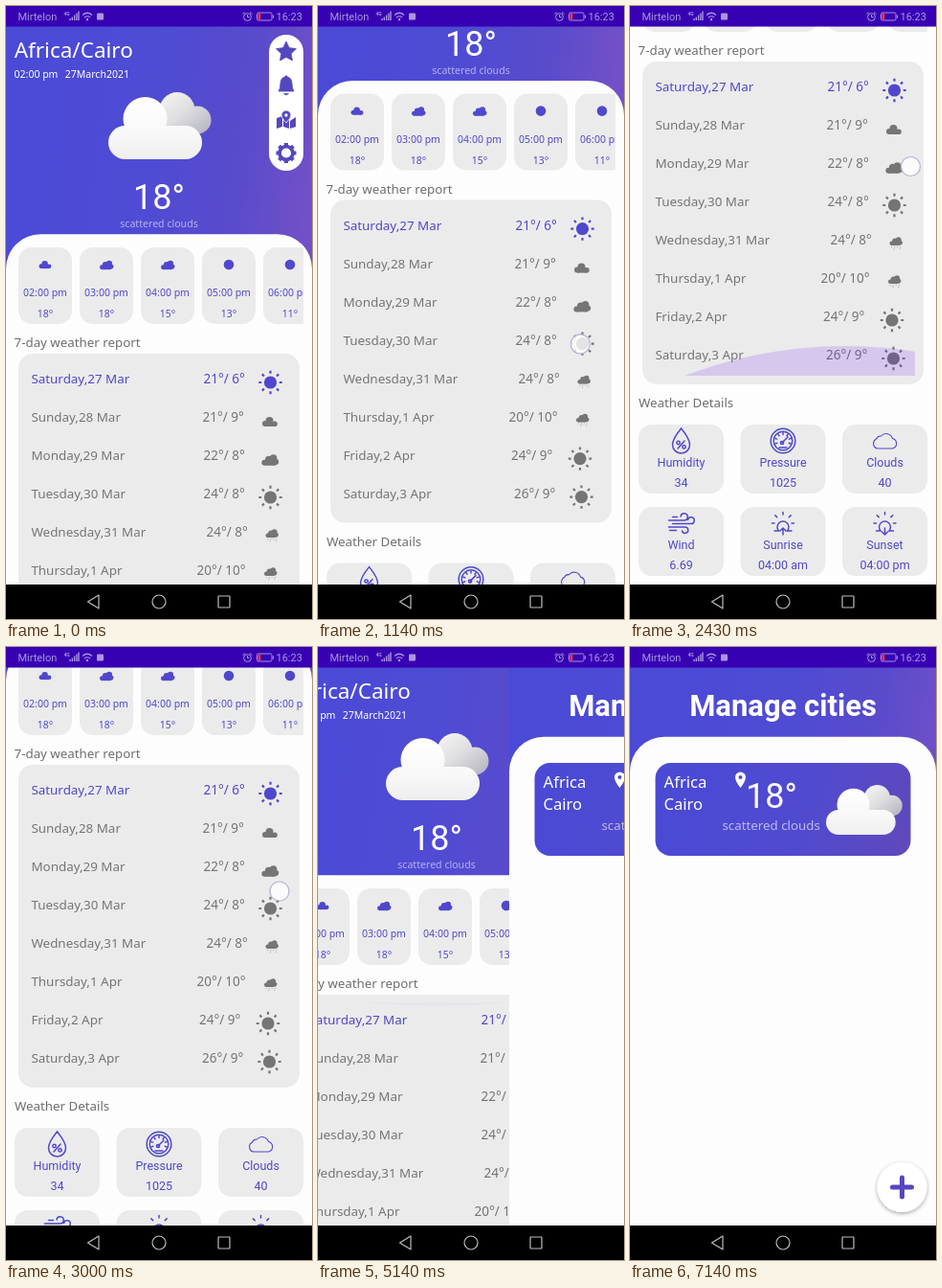
These frames come from a looping animation (320x640 px, 8 s). An HTML page:

```html
<!DOCTYPE html>
<html lang="en">
<head>
<meta charset="utf-8">
<title>Weather app</title>
<style>
  html, body { margin: 0; width: 100%; height: 100%; overflow: hidden; background: #000; }
  svg { display: block; width: 100vw; height: 100vh; }
  text { font-family: "Noto Sans", "Open Sans", sans-serif; white-space: pre; }
  .roboto { font-family: Roboto, Arial, sans-serif; }
</style>
</head>
<body>
<svg id="stage" viewBox="0 0 320 640"></svg>
<script>
const BLUE = '#5048cc', GREY = '#757575', CARD = '#ebebeb', PAPER = '#fdfdfd', INK = '#5547bd';

const text = (x, y, size, fill, str, extra = '') =>
  `<text x="${x}" y="${y}" font-size="${size}" fill="${fill}" ${extra}>${str}</text>`;
const mid = 'text-anchor="middle"';
const box = (x, y, w, h, r, fill, extra = '') =>
  `<rect x="${x}" y="${y}" width="${w}" height="${h}" rx="${r}" fill="${fill}" ${extra}/>`;
const dot = (x, y, r, extra = '') => `<circle cx="${x}" cy="${y}" r="${r}" ${extra}/>`;
const path = (d, extra = '') => `<path d="${d}" ${extra}/>`;
const at = (x, y, body, scale = 1, extra = '') =>
  `<g transform="translate(${x} ${y}) scale(${scale})" ${extra}>${body}</g>`;
const spokes = (n, r1, r2, from = 0, step = 360 / n) => Array.from({ length: n }, (_, i) => {
  const a = (from + i * step) * Math.PI / 180, c = Math.cos(a), s = Math.sin(a);
  return `M${(r1 * c).toFixed(2)} ${(r1 * s).toFixed(2)}L${(r2 * c).toFixed(2)} ${(r2 * s).toFixed(2)}`;
}).join('');

// Weather glyphs, centred on the origin and filled by their group
const glyph = {
  cloud: dot(-5, 2, 3) + dot(-.5, -1, 4) + dot(5, 2.2, 2.8) + path('M-5 0H5V5H-5Z'),
  sun: dot(0, 0, 6.6) + path(spokes(8, 9.3, 12.2), 'stroke="currentColor" stroke-width="2.2"'),
  moon: dot(0, 0, 5.3),
};
glyph.clouds = at(-.6, 1.3, glyph.cloud) + dot(3.6, -1.4, 3.8) + dot(6.6, 2.2, 2.6) + box(4, .5, 4.6, 5, 2, 'currentColor');
glyph.rain = at(0, -1.8, glyph.clouds, .76) +
  path('M-4 4l-1 2M-1 4l-1 4M2 4l-1 2M5 4l-1 3', 'stroke="currentColor" stroke-width=".8" stroke-dasharray="1.2 1" opacity=".7"');
const icon = (name, x, y, color, scale = 1) => at(x, y, glyph[name], scale, `fill="${color}" color="${color}"`);

// Large shaded cloud, 107 by 70
const bigCloud =
  `<g fill="url(#shade)">${dot(72, 18.5, 18.5)}${dot(93, 29, 14.5)}${path('M60 20H93V43.5H60Z')}</g>` +
  `<g fill="url(#puff)">${dot(17.5, 52.5, 17.5)}${dot(38.5, 28, 23)}${dot(80.5, 52.5, 17.5)}${path('M17.5 35H80.5V70H17.5Z')}</g>`;

const star = 'M' + Array.from({ length: 10 }, (_, i) => {
  const r = i % 2 ? 5.4 : 11, a = i * Math.PI / 5;
  return `${(r * Math.sin(a)).toFixed(2)} ${(-r * Math.cos(a)).toFixed(2)}`;
}).join('L') + 'Z';

const sideMenu = box(275, 30, 36, 142, 18, '#fff') + `<g fill="${INK}" stroke="${INK}" stroke-width=".8">` +
  at(293, 48, path(star, 'stroke-linejoin="round"')) +
  at(293, 83, path('M-8 6Q-6 3-6-2Q-6-8-1-9V-10H1V-9Q6-8 6-2Q6 3 8 6Z') + path('M-2.5 8.5H2.5L0 10Z')) +
  at(293, 119, path('M-10-2L-4-4V7L-10 9ZM-3-3L3 0V9L-3 7ZM4 1L10-3V7L4 9Z', 'stroke="none"') +
    path('M0 3Q-5-2-5-5A5 5 0 0 1 5-5Q5-2 0 3Z', 'stroke="#fff"') + dot(0, -5, 1.7, 'fill="#fff" stroke="none"')) +
  at(293, 153.5, dot(0, 0, 6.9, 'fill="none" stroke-width="3.6"') + path(spokes(8, 7, 10.5), 'stroke-width="4"')) + '</g>';

const header = box(0, 0, 320, 300, 0, 'url(#sky)') +
  text(8.7, 54, 22.5, '#fff', 'Africa/Cairo') +
  text(8.6, 75, 10.5, '#fff', '02:00 pm') + text(61.8, 75, 10.5, '#fff', '27March2021') +
  sideMenu + at(107, 90, bigCloud) +
  text(160, 212, 36, '#fff', '18°', mid + ' class="roboto"') +
  text(160, 231, 10.6, '#b5b1ec', 'scattered clouds', mid);

const hours = [['02', 18, 'cloud'], ['03', 18, 'clouds'], ['04', 15, 'clouds'], ['05', 13, 'moon'], ['06', 11, 'moon']]
  .map(([hour, deg, name], i) => {
    const x = 13 + 64 * i;
    return box(x, 252, 56, 80, 14, CARD) + icon(name, x + 28, 270, BLUE, name === 'moon' ? 1 : .82) +
      text(x + 28, 303, 10.5, BLUE, hour + ':00 pm', mid) + text(x + 28, 325, 10.4, BLUE, deg + '°', mid);
  }).join('');

const days = [
  ['Saturday,27 Mar', '21°/ 6°', 206.5, 'sun', 276.5, 393],
  ['Sunday,28 Mar', '21°/ 9°', 205.5, 'cloud', 276, 434],
  ['Monday,29 Mar', '22°/ 8°', 206.5, 'clouds', 276, 473.5],
  ['Tuesday,30 Mar', '24°/ 8°', 206.5, 'sun', 276.5, 513],
  ['Wednesday,31 Mar', '24°/ 8°', 209.6, 'rain', 278, 552],
  ['Thursday,1 Apr', '20°/ 10°', 199.6, 'rain', 276.5, 592],
  ['Friday,2 Apr', '24°/ 9°', 202, 'sun', 274, 633],
  ['Saturday,3 Apr', '26°/ 9°', 205, 'sun', 275.5, 673],
].map(([day, temp, x, name, ix, iy], i) => {
  const color = i ? GREY : BLUE, y = 394 + 40 * i;
  return text(26.4, y, 13.4, color, day) + text(x, y, 13.5, color, temp) + icon(name, ix, iy, color);
}).join('');

const halfSun = 'M-9 8H-4.5A6 6 0 1 1 4.5 8H9' + spokes(5, 9, 11.5, 180, 45);
const lineIcons = {
  Humidity: path('M0-13Q9-2 9 4A9 9 0 0 1-9 4Q-9-2 0-13ZM3.5 0L-3.5 8') + dot(-3, 2, 1.7) + dot(3, 6.4, 1.7),
  Pressure: dot(0, 0, 12.8) + dot(0, 0, 9.8) + path(spokes(7, 6.6, 8.5, 160, 36.7) + 'M-1 2L5-4M-4 7H4') + dot(-1, 2, 1.6),
  Clouds: path('M-8 8A5.4 5.4 0 0 1-9-2A5 5 0 0 1-4-5A7 7 0 0 1 8-2.5A5.4 5.4 0 0 1 8 8Z', 'stroke-width="1.1"'),
  Wind: path('M-13-3H3A3.6 3.6 0 1 0-.5-7M-9 .5H10A3.4 3.4 0 1 0 7-3.5M-13 4H4A3.2 3.2 0 1 1 1 8M-9-6.5H-4M-12 7.5H-5'),
  Sunrise: path(halfSun + 'M0 12V5M-3 8L0 5L3 8'),
  Sunset: path(halfSun + 'M0 5V12M-3 9L0 12L3 9'),
};
const details = [['Humidity', '34'], ['Pressure', '1025'], ['Clouds', '40'],
  ['Wind', '6.69'], ['Sunrise', '04:00 am'], ['Sunset', '04:00 pm']].map(([name, value], i) => {
  const x = 9 + 106.5 * (i % 3), y = i < 3 ? 742 : 828, c = x + 44.5, font = mid + ' class="roboto"';
  return box(x, y, 89, 72, 14, CARD) +
    at(c, y + 17, lineIcons[name], 1, `fill="none" stroke="${BLUE}" stroke-width="1.5" stroke-linecap="round"`) +
    text(c, y + 44, 12.5, BLUE, name, font) + text(c, y + 65, 12.5, BLUE, value, font);
}).join('');

const forecast = `<g id="scroller">${header}${box(0, 238.3, 320, 800, 36, PAPER)}
  <g clip-path="url(#strip)">${hours}</g>
  ${text(8.6, 356, 13.3, '#6e6e6e', '7-day weather report')}
  ${box(13, 363, 294, 337, 15, CARD)}${days}
  <g clip-path="url(#list)" fill="#6200ee">${dot(225, 0, 471, 'id="lowGlow"')}${dot(160, 0, 900, 'id="topGlow"')}</g>
  ${text(9, 724, 13.3, '#6e6e6e', 'Weather Details')}${details}</g>`;

const cities = box(0, 0, 320, 200, 0, 'url(#sky)') +
  text(160, 72, 31, '#fff', 'Manage cities', mid + ' class="roboto" font-weight="700"') +
  box(0, 93.8, 320, 600, 36, PAPER) + box(26.5, 121, 267, 97, 16, 'url(#tile)') +
  text(35.6, 147, 16.6, '#fff', 'Africa') + text(35.4, 170, 16.6, '#fff', 'Cairo') +
  path('M115.5 147Q110 140 110 136A5.5 5.5 0 0 1 121 136Q121 140 115.5 147ZM115.5 134A2 2 0 1 0 115.5 138A2 2 0 1 0 115.5 134Z', 'fill="#fff" fill-rule="evenodd"') +
  text(148, 168, 36, '#fff', '18°', mid + ' class="roboto"') +
  text(96.5, 191, 13.3, '#bfb9ee', 'scattered clouds') +
  at(205, 144, bigCloud, .742) +
  dot(284.5, 564, 26, 'fill="#fff" filter="url(#lift)"') +
  path('M284.5 554V574M274.5 564H294.5', `stroke="${INK}" stroke-width="5" stroke-linecap="round"`);

const pale = '#ab97df';
const systemBars = box(0, 0, 320, 21.5, 0, '#3700b3') +
  text(12.5, 15, 11, pale, 'Mirtelon', 'class="roboto"') + text(60.5, 9.5, 5, pale, '4G', 'class="roboto" font-weight="700"') +
  path('M67 15V13M69.3 15V11.5M71.6 15V9.5M73.9 15V7.5M76 15V5.5', `stroke="${pale}" stroke-width="1.4"`) +
  path('M80 9.5Q85 5 90 9.5M82 12Q85 9.5 88 12', `fill="none" stroke="${pale}" stroke-width="1.2"`) + dot(85, 14, 1.2, `fill="${pale}"`) +
  box(95, 7.5, 7, 7, 1, pale) +
  `<g fill="none" stroke="${pale}">${dot(252.5, 11.5, 3.9)}${path('M252.5 9V11.5H254.5M247.5 8.5L250 6.5M255 6.5L257.5 8.5')}${box(262.5, 7, 15.5, 8, 1.5, 'none')}${path('M279.5 9.5V12.5')}</g>` +
  box(263.5, 8, 2.8, 6, 0, '#f0354b') + text(282.5, 15, 11, pale, '16:23', 'class="roboto"') +
  box(0, 604, 320, 36, 0, '#000') +
  `<g fill="none" stroke="#bdbdbd" stroke-width="1.2">${path('M85.5 622L97 615V629Z', 'stroke-linejoin="round"')}${dot(160, 622, 7)}${box(222, 616, 12, 12, .5, 'none')}</g>`;

const gradient = (id, coords, ...stops) => `<linearGradient id="${id}" gradientUnits="userSpaceOnUse" ${coords}>` +
  stops.map(([offset, color]) => `<stop offset="${offset}" stop-color="${color}"/>`).join('') + '</linearGradient>';

const stage = document.getElementById('stage');
stage.innerHTML = `<defs>
  ${gradient('sky', 'x1="0" y1="80" x2="325" y2="125"', [0, '#4a4ad7'], [.5, '#4f4bd4'], [.78, '#594bcb'], [1, '#7150c8'])}
  ${gradient('tile', 'x1="30" y1="121" x2="300" y2="218"', [0, '#4a4ad6'], [.55, '#504ad0'], [1, '#6149b9'])}
  ${gradient('puff', 'x1="0" y1="5" x2="0" y2="70"', [0, '#fff'], [.6, '#f8f8f8'], [1, '#eee'])}
  ${gradient('shade', 'x1="60" y1="0" x2="95" y2="45"', [0, '#f4f4f4'], [.5, '#dedee0'], [1, '#b9b9c4'])}
  <clipPath id="strip"><rect y="240" width="311" height="100"/></clipPath>
  <clipPath id="list"><rect x="22" y="371" width="276" height="320"/></clipPath>
  <filter id="lift" x="-30%" y="-30%" width="160%" height="160%"><feDropShadow dx="0" dy="1.5" stdDeviation="2" flood-opacity=".35"/></filter>
  </defs><g id="forecast">${forecast}</g><g id="cities">${cities}</g>
  <circle id="finger" r="10" fill="#fff" fill-opacity=".8" stroke="#b9b3d6" stroke-width="1.2"/>${systemBars}`;

const part = Object.fromEntries(['scroller', 'forecast', 'cities', 'finger', 'lowGlow', 'topGlow']
  .map(id => [id, document.getElementById(id)]));

// Linear interpolation through [tick, value] pairs
function track(keys, t) {
  const next = keys.findIndex(key => key[0] > t);
  if (next < 0) return keys.at(-1)[1];
  if (next === 0) return keys[0][1];
  const [t0, v0] = keys[next - 1], [t1, v1] = keys[next];
  return v0 + (v1 - v0) * (t - t0) / (t1 - t0);
}

const SCROLL = [[3.17, 0], [6, 94], [11, 260], [13, 305], [19, 305], [20, 290], [21, 240], [22, 165], [23, 90], [24, 35], [25, 0]];
const FINGER_X = [[3, 250], [6, 263.5], [11, 290.5], [17, 293.5]];
const FINGER_Y = [[3, 516], [6, 418.5], [11, 254.5], [13, 208], [17, 167.5], [18, 162]];
const LOW_GLOW = [[12, 0], [17, 1], [18, .8], [20, 0]];
const TOP_GLOW = [[24, 0], [25, 1], [26, .5], [27, .18]];
const SLIDE = [[35, 320], [36, 200], [37, 80], [38, 20], [39, 0]];

function fingerAt(tick, scroll) {
  if (tick >= 4 && tick <= 18) return [track(FINGER_X, tick), track(FINGER_Y, tick)];
  if (tick >= 20 && tick <= 22) return [286, 190 + 305 - scroll];
  if (tick === 34) return [293, 118];
  return null;
}

const TICKS_PER_SECOND = 7, LOOP = 8000;

function draw(ms) {
  const tick = Math.floor((ms % LOOP + 5) * TICKS_PER_SECOND / 1000);
  const scroll = track(SCROLL, tick), slide = track(SLIDE, tick);
  part.scroller.setAttribute('transform', `translate(0 ${-scroll})`);
  part.forecast.setAttribute('transform', `translate(${(slide - 320) * .3} 0)`);
  part.cities.setAttribute('transform', `translate(${slide} 0)`);

  const low = track(LOW_GLOW, tick), top = track(TOP_GLOW, tick);
  part.lowGlow.setAttribute('cy', 691 + 471 - 31 * low);
  part.lowGlow.setAttribute('opacity', .15 * low);
  part.topGlow.setAttribute('cy', 371 - 900 + 20 * top);
  part.topGlow.setAttribute('opacity', .12 * top);

  const touch = fingerAt(tick, scroll);
  part.finger.setAttribute('visibility', touch ? 'visible' : 'hidden');
  if (touch) part.finger.setAttribute('transform', `translate(${touch})`);
}

const start = performance.now();
function loop() {
  draw(performance.now() - start);
  requestAnimationFrame(loop);
}
loop();
</script>
</body>
</html>
```
